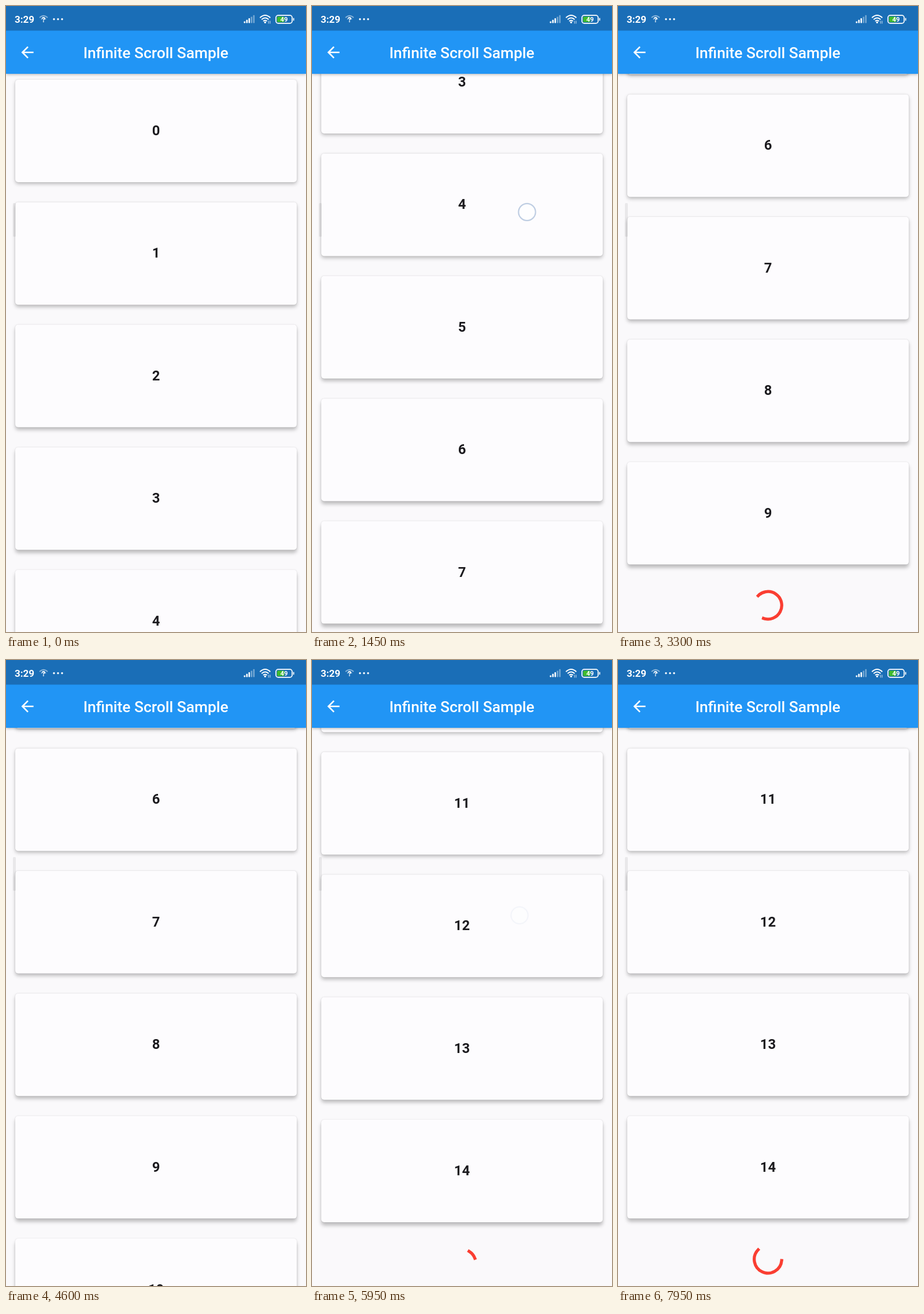
Write an HTML page that moves like this. It is 519 px wide and 1080 px high and loops after 8000 ms.

```html
<!DOCTYPE html>
<html lang="en">
<head>
<meta charset="utf-8">
<title>Infinite Scroll Sample</title>
<style>
html, body { margin: 0; width: 100%; height: 100%; overflow: hidden; background: #faf9fb; }
#stage { position: relative; width: 519px; height: 1080px; overflow: hidden; font-family: Roboto, sans-serif; }
.card {
  position: absolute; left: 15.8px; top: 0; width: 487.4px; height: 177px;
  border-radius: 5px; background: #fdfcfe; color: #1c1b1f;
  font-size: 23.76px; font-weight: 700; line-height: 177px; text-align: center;
}
svg { position: absolute; left: 0; top: 0; }
#bar {
  position: absolute; left: 0; top: 0; width: 519px; height: 116.5px;
  background: #2195f5; box-shadow: 0 1px 5px rgba(0,0,0,.3);
}
</style>
</head>
<body>
<div id="stage">
  <div id="list"></div>
  <svg width="519" height="1080">
    <rect x="12" y="340" width="5" height="58" rx="1.5" fill="#000" opacity=".065"/>
    <path id="spin" fill="none" stroke="#fa3e32" stroke-width="5.28" stroke-linecap="square"/>
    <ellipse id="glow" cx="259.5" rx="778.5" fill="#2196f3"/>
    <g id="touch">
      <circle r="14.6" fill="#fff" fill-opacity=".6" stroke="#b4c6df" stroke-width="2"/>
      <circle r="15.8" fill="none" stroke="#7890b0" stroke-opacity=".15"/>
    </g>
  </svg>
  <div id="bar"></div>
  <svg width="519" height="117" fill="#fff">
    <rect width="519" height="42.5" fill="#1a6eb7"/>
    <text x="15" y="28.8" font-size="17" font-weight="700">3:29</text>
    <g fill="none" stroke="#fff" stroke-width="1.8" opacity=".5">
      <path d="M58 20Q65 13.5 72 20M61 23Q65 19 69 23"/>
    </g>
    <text x="65" y="28" font-size="13" font-weight="700" text-anchor="middle">?</text>
    <circle cx="83" cy="22.7" r="1.7"/><circle cx="90" cy="22.7" r="1.7"/><circle cx="97" cy="22.7" r="1.7"/>
    <g id="signal"></g>
    <g fill="none" stroke="#fff" stroke-width="2">
      <path d="M439.3 20.2Q448.3 11.8 457.3 20.2M442.2 23.4Q448.3 17.6 454.4 23.4M445 26.3Q448.3 23.2 451.6 26.3"/>
    </g>
    <circle cx="448.3" cy="28.2" r="1.7"/>
    <path d="M454.2 30.5v-5M456.9 25.5v5" stroke="#fff" stroke-width="1" opacity=".8"/>
    <rect x="469" y="18.2" width="12.5" height="9.6" rx="1.5" fill="#3fba2e"/>
    <rect x="467" y="16.2" width="28" height="13.6" rx="3.8" fill="none" stroke="#fff" stroke-width="1.7"/>
    <rect x="496.7" y="20.5" width="1.8" height="5" rx=".9"/>
    <text x="481" y="27" font-size="11.3" font-weight="700" text-anchor="middle">49</text>
    <path transform="translate(21.2 64.2) scale(1.32)" d="M20 11H7.83l5.59-5.59L12 4l-8 8 8 8 1.41-1.41L7.83 13H20v-2z"/>
    <text x="259.2" y="89.5" font-size="26.4" font-weight="500" text-anchor="middle">Infinite Scroll Sample</text>
  </svg>
</div>
<script>
const $ = id => document.getElementById(id);
const LOOP = 8000, PITCH = 211.4, LOADED = 4575;
const END = [1243, 2300];

// time, offset, speed
const SCROLL = [
  [400, 0, 0], [900, 110, .35], [1250, 330, 1.1], [1450, 715, 3.2],
  [1615, 1243, 3.1], [1616, 1243, 0], [5300, 1243, 0], [5330, 1258, .9],
  [5500, 1443, 1.2], [5815, 1880, 2.6], [5950, 2290.4, 2.9], [5954, 2300, 0]
];
const SWIPES = [
  { down: 400, up: 1425, x: 372, y: 355.5, at: 640 },
  { down: 5300, up: 5785, x: 359, y: 440.5, at: 1803 }
];
const GLOWS = [{ hit: 1616, fade: 1750 }, { hit: 5954, fade: 6155 }];

const clamp = (v, a = 0, b = 1) => Math.min(b, Math.max(a, v));
const frac = v => v - Math.floor(v);

function scrollAt(t) {
  const i = SCROLL.findIndex(p => p[0] > t);
  if (i === 0) return 0;
  if (i < 0) return END[1];
  const [t0, s0, v0] = SCROLL[i - 1], [t1, s1, v1] = SCROLL[i];
  const d = t1 - t0, u = (t - t0) / d, w = 1 - u;
  return s0 * w * w * (1 + 2 * u) + s1 * u * u * (3 - 2 * u) + d * u * w * (v0 * w - v1 * u);
}

// cubic-bezier(.4, 0, .2, 1)
function ease(x) {
  x = clamp(x);
  let a = 0, b = 1, s = .5;
  for (let i = 0; i < 24; i++) {
    s = (a + b) / 2;
    const r = 1 - s;
    if (1.2 * s * r * r + .6 * s * s * r + s * s * s < x) a = s; else b = s;
  }
  return s * s * (3 - 2 * s);
}

function drawSpinner(t, s) {
  const page = t < LOADED ? 0 : 1;
  const age = (t - [1553, 5816][page]) * 1.008;
  $("spin").style.display = age < 0 ? "none" : "";
  if (age < 0) return;
  const p = frac(age / 1333);
  const head = ease(p * 2) * 270, tail = ease(p * 2 - 1) * 270;
  const from = -90 + tail + age / 2222 * 360 + p * 90;
  const sweep = Math.max(head - tail, .1);
  const cy = 1034 + END[page] - s, r = 23.76;
  const pt = deg => {
    const a = deg * Math.PI / 180;
    return (259.5 + r * Math.cos(a)).toFixed(3) + " " + (cy + r * Math.sin(a)).toFixed(3);
  };
  $("spin").setAttribute("d", `M${pt(from)}A${r} ${r} 0 ${sweep > 180 ? 1 : 0} 1 ${pt(from + sweep)}`);
}

function drawGlow(t) {
  const g = GLOWS[t < 5000 ? 0 : 1];
  const rise = 1 - (1 - clamp((t - g.hit) / (g.fade - g.hit))) ** 2;
  const fall = (1 - clamp((t - g.fade) / 600)) ** 2;
  const k = rise * fall, ry = 778.5 * k;
  $("glow").setAttribute("ry", ry);
  $("glow").setAttribute("cy", 1080 - 104.3 * k + ry);
  $("glow").setAttribute("opacity", t < g.hit ? 0 : .3 * fall);
}

function drawTouch(t, s) {
  const w = SWIPES[t < 5000 ? 0 : 1];
  const dy = Math.max(0, w.at - s);
  const shown = t < w.down ? 0 : clamp(1 - (t - w.up) / 190);
  $("touch").setAttribute("opacity", shown);
  $("touch").setAttribute("transform", `translate(${w.x - dy * .29} ${w.y + dy})`);
}

const cards = Array.from({ length: 15 }, (_, i) => {
  const el = document.createElement("div");
  el.className = "card";
  el.textContent = i;
  return $("list").appendChild(el);
});

$("signal").innerHTML = [0, 1, 2, 3, 4].map(i =>
  `<rect x="${411.5 + i * 4}" y="${26.5 - i * 2.7}" width="2.6" height="${3 + i * 2.7}" rx=".8" opacity="${i < 3 ? 1 : .4}"/>`
).join("");

function draw(t) {
  const s = scrollAt(t), count = t < LOADED ? 10 : 15;
  cards.forEach((el, i) => {
    const y = 127 + i * PITCH - s;
    const on = i < count && y > -80 && y < 1100;
    el.style.display = on ? "" : "none";
    if (!on) return;
    const drop = 2.5 + clamp(y / 1080) * 4;
    el.style.transform = `translateY(${y.toFixed(2)}px)`;
    el.style.boxShadow = `0 ${drop}px 6px rgba(0,0,0,.25), 0 0 2px rgba(0,0,0,.14)`;
  });
  drawSpinner(t, s);
  drawGlow(t);
  drawTouch(t, s);
}

const start = performance.now();
function tick() {
  draw((performance.now() - start) % LOOP);
  requestAnimationFrame(tick);
}
tick();
</script>
</body>
</html>
```
